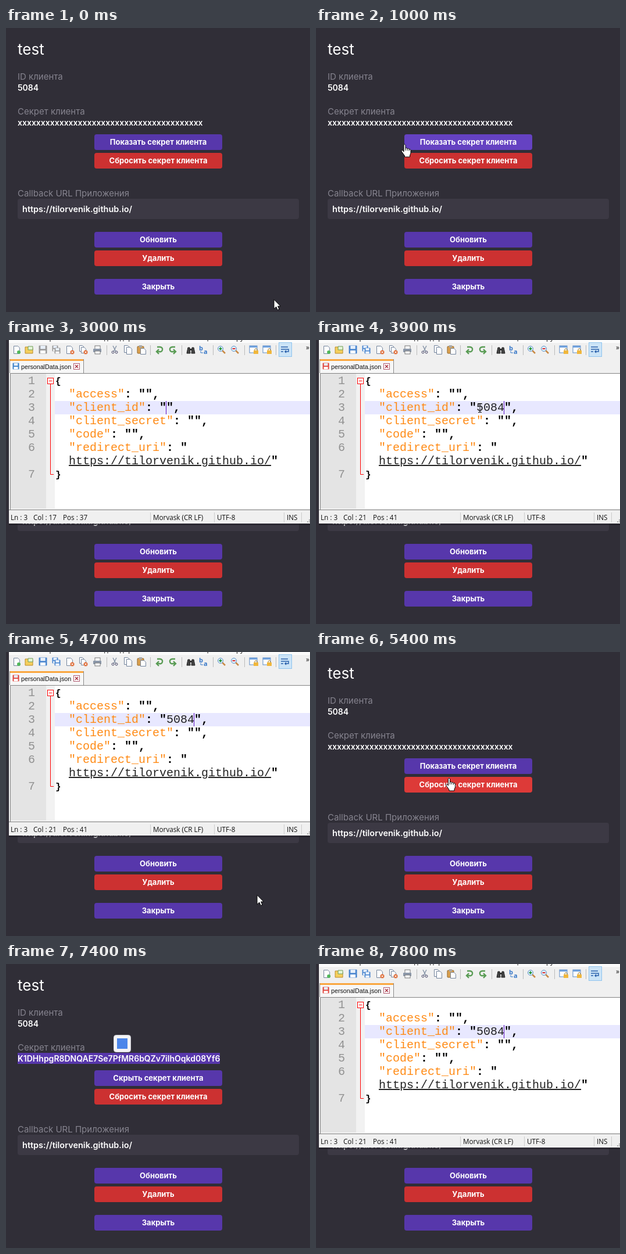
Animation of 523 by 489 pixels, one loop 8000 ms. Source, as an HTML page:

```html
<!DOCTYPE html>
<html lang="ru">
<head>
<meta charset="utf-8">
<style>
html, body { margin: 0; width: 100%; height: 100%; overflow: hidden; background: #302e37; }
svg { display: block; width: 523px; height: 489px; }
text { white-space: pre; }
.page text { font: 600 14px Inter, sans-serif; fill: #fff; }
.page .title { font-size: 26px; font-weight: 400; }
.page .label { font-size: 15px; font-weight: 400; fill: #86848f; }
.page .url { font-size: 14.5px; }
.page .btn { font-size: 13px; font-weight: 700; text-anchor: middle; }
.ui text { font: 11.7px "Open Sans", sans-serif; fill: #111; }
.ui .tab { font: 10.7px "Liberation Sans", sans-serif; }
.ui .code { font: 20px "Liberation Mono", monospace; fill: #222; }
.ui .brace { font: bold 16px "Liberation Mono", monospace; fill: #000; }
.ui .num { font: 20px "Liberation Mono", monospace; fill: #929292; }
.key { fill: #ff8a14; }
.mark { font-weight: bold; fill: #000; }
</style>
</head>
<body>
<svg id="stage" viewBox="0 0 523 489"></svg>
<script>
const rect = (x, y, w, h, fill, more = '') =>
  `<rect x="${x}" y="${y}" width="${w}" height="${h}" fill="${fill}" ${more}/>`;
const text = (x, y, s, cls = '', id = '') => `<text x="${x}" y="${y}" class="${cls}" id="${id}">${s}</text>`;
const path = (d, stroke, fill = 'none', w = 1) =>
  `<path d="${d}" stroke="${stroke}" fill="${fill}" stroke-width="${w}"/>`;
const group = (id, body, more = '') => `<g id="${id}" ${more}>${body}</g>`;

const VIOLET = '#5737ab', RED = '#cc3131';
const URL_TEXT = 'https://tilorvenik.github.io/';
const SECRET = 'K1DHhpgR8DNQAE7Se7PfMR6bQZv7ilhOqkd08Yf6';

// Web page
const buttons = [
  [183, 'Показать секрет клиента', VIOLET],
  [215, 'Сбросить секрет клиента', RED],
  [351, 'Обновить', VIOLET],
  [383, 'Удалить', RED],
  [432, 'Закрыть', VIOLET]
];
const page = rect(0, 0, 523, 489, '#302e37') +
  text(20, 46, 'test', 'title') +
  text(20, 89, 'ID клиента', 'label') +
  rect(20, 93, 35, 19, VIOLET, 'id="idMark"') + text(20, 108, '5084') +
  text(20, 149, 'Секрет клиента', 'label') +
  rect(20, 153, 348, 19, VIOLET, 'id="secretMark"') + text(20, 168, '', '', 'secret') +
  text(20, 290, 'Callback URL Приложения', 'label') +
  rect(20, 294, 484, 35, '#3c3944', 'rx="4"') + text(28, 317, URL_TEXT, 'url') +
  buttons.map(([y, s, c], i) =>
    rect(152, y, 220, 27, c, `rx="4" id="box${i}"`) + text(262, y + 18, s, 'btn', 'cap' + i)).join('') +
  group('popup', rect(185.5, 122.5, 29, 29, '#f4f4f6', 'rx="4" stroke="#d0d0d6"') +
    rect(191, 128, 18, 18, '#4c86ea'));

// Toolbar icons, each in a 16 by 16 cell
const sheet = (x, y, w = 9, h = 12) => path(`M${x} ${y}h${w - 3}l3 3v${h - 3}h${-w}z`, '#73849c', '#fff');
const floppy = (c, x = 0, y = 0, s = 15) => rect(x + .5, y + .5, s - 1, s - 1, c, 'rx="1"') +
  rect(x + s * .22, y + 1, s * .56, s * .36, '#e8f0fa') + rect(x + s * .2, y + s * .6, s * .6, s * .34, '#fff');
const arrowBack = path('M4 3H9Q14 4 13 8T8 11H3M7 7L3 11L7 15', '#5a9c55', 'none', 2.4);
const lens = c => path('M9 9L14 14', '#c98a45', 'none', 2.5) +
  '<circle cx="6" cy="6" r="4.5" fill="#dff0ff" stroke="#5c8fc4"/>' + path('M3.5 6H8.5', c, 'none', 2);
const lockPanes = rect(1, 1, 13, 12, '#fff', 'stroke="#5a8ac6"') + rect(1, 1, 13, 3, '#6fa0dc') +
  path('M10 9V7Q12 4 14 7V9', '#a0792a') + rect(8, 9, 8, 6, '#f0b73c');
const badge = '<circle cx="12" cy="12" r="3.5" fill="#e0703c"/>' + path('M10.5 10.5L13.5 13.5M13.5 10.5L10.5 13.5', '#fff');
const icons = [
  [18, sheet(3.5, 1.5, 10, 13) + '<circle cx="12" cy="12" r="3" fill="#52b85a"/>'],
  [40, path('M1 6V14H14V5H7L6 3H1z', '#b98a2c', '#f5cf5d') + path('M6 2h8v6h-8z', '#6f9b57', '#e6f6d8')],
  [64, group('save', floppy('#999'))],
  [87, group('saveAll', floppy('#999', 0, 0, 11) + floppy('#999', 4, 4, 11))],
  [110, sheet(2.5, 1.5, 10, 13) + badge],
  [133, sheet(1.5, .5, 8, 10) + sheet(4.5, 3.5, 8, 10) + badge],
  [157, rect(4, 1, 9, 6, '#fff', 'stroke="#777"') + rect(1, 6, 14, 6, '#8c98aa', 'rx="1"') + rect(4, 10, 9, 5, '#fff', 'stroke="#777"')],
  [187, path('M5 1L10 11M11 1L6 11', '#8a98aa', 'none', 1.5) +
    '<circle cx="5" cy="12" r="2" fill="none" stroke="#446"/><circle cx="11" cy="12" r="2" fill="none" stroke="#446"/>'],
  [210, sheet(1.5, .5) + sheet(5.5, 3.5)],
  [233, rect(1, 2, 11, 12, '#d9a04f', 'rx="1" stroke="#93672a"') + rect(4, 0, 5, 4, '#aaa') + sheet(6.5, 5.5, 9, 10)],
  [264, arrowBack],
  [287, `<g transform="translate(16) scale(-1 1)">${arrowBack}</g>`],
  [318, path('M3 4h3l1 10H1zM10 4h3l2 10H9z', '#222', '#444') + rect(5, 6, 6, 3, '#333')],
  [340, '<text x="0" y="9" style="font:bold 11px Open Sans,sans-serif;fill:#3878c8">b</text>' +
    '<text x="8" y="15" style="font:bold 11px Open Sans,sans-serif;fill:#3878c8">a</text>' + path('M3 10V13H7', '#3878c8')],
  [371, lens('#2b963c') + path('M6 3.5V8.5', '#2b963c', 'none', 2)],
  [394, lens('#d33')],
  [426, lockPanes],
  [449, lockPanes],
  [480, rect(-2.5, -4.5, 22, 24, '#cce4f7', 'stroke="#8fc4ee"') +
    path('M1 3H13M1 7H14V11H8M1 11H5M10 9L8 11L10 13', '#2c62ad', 'none', 1.5)]
].map(([x, body]) => `<g transform="translate(${x - 8} 9)">${body}</g>`).join('');

// Editor window
const mark = s => `<tspan class="mark">${s}</tspan>`;
const key = s => `<tspan class="key">"${s}"</tspan>` + mark(': "');
const lines = [
  [85, '{', 'brace'],
  [108, key('access') + mark('",')],
  [108, key('client_id') + '<tspan id="typed"></tspan>' + mark('",')],
  [108, key('client_secret') + mark('",')],
  [108, key('code') + mark('",')],
  [108, key('redirect_uri')],
  [108, `<tspan text-decoration="underline">${URL_TEXT}</tspan>` + mark('"')],
  [85, '}', 'brace']
];
const base = i => 76 + 23 * i;
const editor = rect(5, 0, 518, 319, '#1c1a22', 'opacity=".5"') +
  rect(5, 0, 518, 316, '#f0f0f0') + rect(5, 0, 518, 5, '#fbfbfb') +
  text(30, 0, 'Файл  Правка  Поиск  Вид  Кодировки  Синтаксисы  Опции  Инструменты') +
  icons + path('M173.5 9V26M248.5 9V26M302.5 9V26M356.5 9V26M410.5 9V26M464.5 9V26', '#bbb') +
  text(516, 17, '»') +
  rect(7, 33, 126, 24, '#f7f7f7') + rect(7, 33, 126, 3, '#faa63e') +
  path('M6.5 33V57M133.5 33V57', '#888') +
  group('tabDisk', floppy('#3a80c8', 11, 39, 12)) + text(26, 50, 'personalData.json', 'tab') +
  rect(116.5, 40.5, 10, 10, '#fff', 'stroke="#b05a70"') + path('M119 43L124 48M124 43L119 48', '#a34', 'none', 1.5) +
  rect(8, 58, 515, 232, '#fff') + path('M523 57.5H7.5V292', '#828282') + path('M5 292.5H523', '#828282') +
  rect(8, 58, 61, 232, '#e4e4e4') + rect(69, 58, 15, 232, '#f2f2f2') +
  rect(84, 105, 439, 23, '#e8e8ff') +
  path('M76.5 76V231.5H82', '#f00') + rect(71.5, 65.5, 10, 10, '#fff', 'stroke="#f00"') + path('M74 70.5H79', '#f00') +
  [0, 1, 2, 3, 4, 5, 7].map((row, i) => text(38, base(row), i + 1, 'num')).join('') +
  lines.map(([x, s, cls = 'code'], i) => text(x, base(i), s, cls)).join('') +
  rect(275, 105, 1, 23, '#6010c0', 'id="caret"') +
  path('M248.5 297V314M358.5 297V314M478.5 297V314M508.5 297V314', '#ccc') +
  text(8, 310, 'Ln : 3') + text(47, 310, '', '', 'col') + text(98, 310, '', '', 'pos') +
  text(253, 310, 'Morvask (CR LF)') + text(363, 310, 'UTF-8') + text(483, 310, 'INS') +
  path('M518 313h2M521 313h2M521 310h2', '#aaa', 'none', 2);

const cursors =
  group('arrow', path('M0 .5V16.5L3.8 13L6.3 18.5L9 17.3L6.6 12H11.3z', '#000', '#fff')) +
  group('beam', '<path d="M-3 -7.5H-1Q0 -7.5 0 -6.5Q0 -7.5 1 -7.5H3M0 -7V7M-3 7.5H-1Q0 7.5 0 6.5Q0 7.5 1 7.5H3" fill="none"/>') +
  group('hand', path('M-1.5 1.5Q0 -1 1.5 1.5V7Q3.5 5.8 4.6 7.6Q6.6 6.8 7.6 8.6Q9.8 8 10.5 10.5V15Q10.5 17 9 19V22H0V20L-5 13Q-6.5 10.5 -4.5 10.3Q-3 10.5 -1.5 13z', '#000', '#fff') +
    path('M1.5 7V11M4.6 8V11M7.6 9V11.5', '#000'));

const stage = document.getElementById('stage');
stage.innerHTML = group('page', page, 'class="page"') + group('editor', editor, 'class="ui"') + group('cursor', cursors);

const $ = id => document.getElementById(id);
const show = (id, on) => $(id).style.display = on ? '' : 'none';
const put = (id, s) => $(id).textContent = s;
const within = (v, a, b) => v >= a && v < b;

// Pointer path: time, x, y
const track = [
  [0, 461, 467], [400, 461, 467], [1300, 44.5, 106], [1400, 42.5, 104], [1900, 42.5, 104], [2300, 201, 315],
  [3000, 205, 500], [3700, 282, 117], [3900, 282, 117], [4700, 432, 418], [4900, 432, 418],
  [5400, 229, 217], [5700, 231, 188], [5800, 231, 188], [6100, 222, 187], [6200, 222, 187],
  [6500, 190, 162], [7000, 190, 162], [7300, 205, 326], [8000, 205, 326]
];
function pointer(t) {
  const i = track.findIndex(k => k[0] > t), [t0, x0, y0] = track[i - 1], [t1, x1, y1] = track[i];
  const u = (t - t0) / (t1 - t0), e = u * u * (3 - 2 * u);
  return [x0 + (x1 - x0) * e, y0 + (y1 - y0) * e];
}

function draw(now) {
  const t = Math.floor(now % 8000 / 100) * 100;
  const editing = within(t, 3000, 4800) || t >= 7800;
  const typed = t >= 3900, shown = t >= 5900;
  const [x, y] = pointer(t);
  const visible = !within(t, 2400, 3100) && t < 7400;

  show('editor', editing);
  show('idMark', within(t, 1700, 4800));
  show('secretMark', t >= 6500);
  show('popup', t >= 6600);
  put('secret', shown ? SECRET : 'x'.repeat(40));
  put('cap0', shown ? 'Скрыть секрет клиента' : buttons[0][1]);

  put('typed', typed ? '5084' : '');
  put('col', 'Col : ' + (typed ? 21 : 17));
  put('pos', 'Pos : ' + (typed ? 41 : 37));
  $('caret').setAttribute('x', typed ? 323 : 275);
  const disk = typed ? '#4a86cf' : '#999';
  for (const id of ['save', 'saveAll'])
    $(id).querySelectorAll('[rx]').forEach(r => r.setAttribute('fill', disk));
  $('tabDisk').firstChild.setAttribute('fill', typed ? '#e0443c' : '#3a80c8');

  const covered = editing && y < 316;
  let hot = false;
  buttons.forEach(([top, , color], i) => {
    const over = visible && !covered && within(x, 152, 372) && within(y, top, top + 27);
    hot = hot || over;
    $('box' + i).setAttribute('fill', !over ? color : color === RED ? '#dd3a38' : '#6542c2');
  });
  const onText = covered ? within(y, 58, 290) && x > 84 :
    within(y, 294, 329) || within(y, 153, 172) && x < 368 || within(y, 93, 112) && x < 56;
  show('cursor', visible);
  show('hand', hot);
  show('beam', !hot && onText);
  show('arrow', !hot && !onText);
  $('beam').setAttribute('stroke', covered ? '#000' : '#fff');
  $('cursor').setAttribute('transform', `translate(${Math.round(x * 2) / 2} ${Math.round(y)})`);
}

const start = performance.now();
(function tick() {
  draw(performance.now() - start);
  requestAnimationFrame(tick);
})();
</script>
</body>
</html>
```
